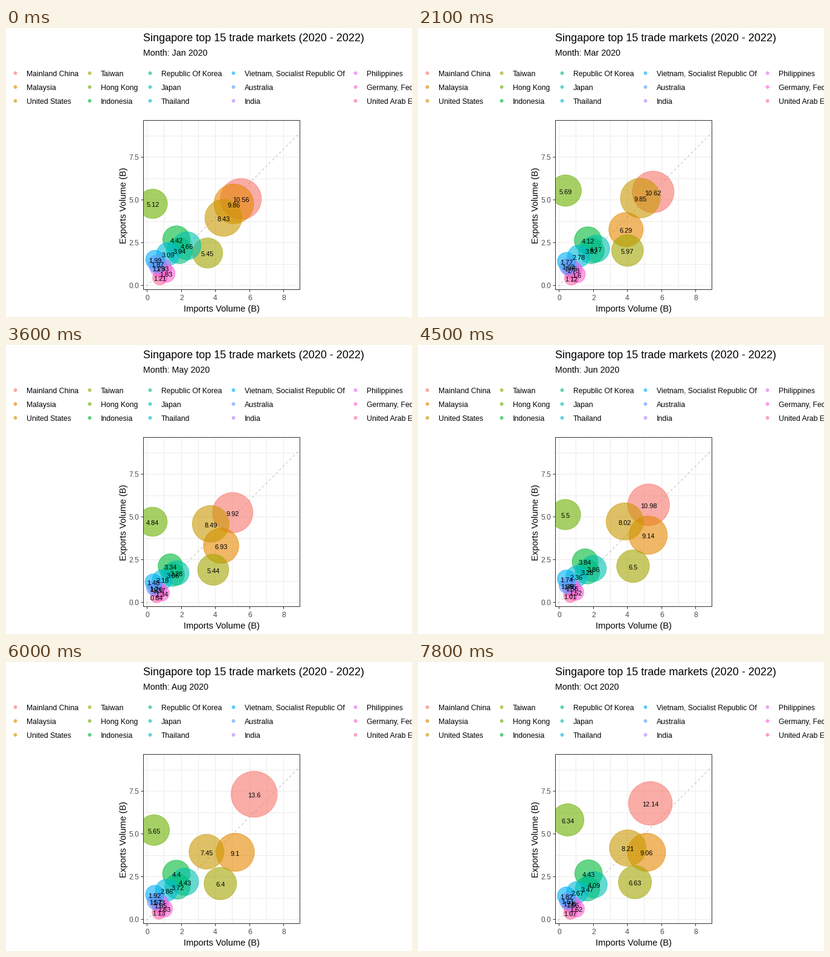
A matplotlib script for the animation above (8 s loop, 672 by 480 pixels).

```python
import matplotlib.pyplot as plt
import numpy as np
from matplotlib.animation import FuncAnimation
from matplotlib.patches import Circle, Rectangle

W, H, DPI = 672, 480, 100
PX = 72 / DPI
INTERVAL, FRAMES, FRAMES_PER_STEP = 100, 80, 3
DAYS_PER_STEP = 1065 / 99
LEFT, RIGHT, TOP, BOTTOM = 227, 486, 153, 434
ORIGIN = np.array([233.4, 427.9])
UNIT = np.array([28.3, -28.4])

plt.rcParams["font.family"] = ["Liberation Sans", "DejaVu Sans"]

LEGEND = [
    "Mainland China", "Malaysia", "United States", "Taiwan", "Hong Kong",
    "Indonesia", "Republic Of Korea", "Japan", "Thailand",
    "Vietnam, Socialist Republic Of", "Australia", "India", "Philippines",
    "Germany, Federal Republic Of", "United Arab Emirates",
]

# Monthly totals, and the import share at the start, middle and end.
MAJOR = {
    "Mainland China": ([10.56, 7.89, 11.35, 10.62, 9.92, 10.98, 10.93,
                        13.6, 12.04, 12.14], [0.52, 0.485, 0.44]),
    "Malaysia": ([9.86, 9.07, 8.1, 6.29, 6.93, 9.14, 9.18,
                  9.1, 9.15, 9.06], [0.515, 0.57, 0.565]),
    "United States": ([8.43, 8.66, 9.9, 9.85, 8.49, 8.02, 9.75,
                       7.45, 7.75, 8.21], [0.53, 0.44, 0.49]),
    "Taiwan": ([5.45, 5.62, 6.15, 5.97, 5.44, 6.5, 6.38,
                6.4, 6.77, 6.63], [0.65, 0.67, 0.67]),
    "Hong Kong": ([5.12, 5.34, 6.2, 5.69, 4.84, 5.5, 5.56,
                   5.65, 6.07, 6.34], [0.065, 0.065, 0.08]),
}
# Typical total and import share; these follow a common season.
MINOR = {
    "Indonesia": (4.2, 0.39),
    "Japan": (4.15, 0.5),
    "Republic Of Korea": (3.75, 0.48),
    "Thailand": (2.75, 0.4),
    "India": (1.65, 0.4),
    "Philippines": (1.7, 0.47),
    "United Arab Emirates": (1.1, 0.62),
    "Germany, Federal Republic Of": (1.67, 0.61),
    "Vietnam, Socialist Republic Of": (1.85, 0.235),
    "Australia": (1.6, 0.32),
}

START = np.datetime64("2020-01-01")
MONTHS = np.arange("2020-01", "2020-11", dtype="datetime64[M]")
MONTH_DAYS = (MONTHS.astype("datetime64[D]") - START).astype(int)
MONTH_STEPS = np.round(MONTH_DAYS / DAYS_PER_STEP)
STEPS = np.arange(-(-FRAMES // FRAMES_PER_STEP))


def season(month):
    """Slow decline with a sharp dip in May."""
    return 1.1 - 0.012 * month - 0.28 * np.exp(-(month - 4.2) ** 2)


def build_series():
    """Map each market to its monthly totals and its import share per step."""
    rng = np.random.default_rng(15)
    thirds = np.linspace(0, STEPS[-1], 3)
    series = {name: (np.array(totals), np.interp(STEPS, thirds, shares))
              for name, (totals, shares) in MAJOR.items()}
    months = np.arange(len(MONTHS))
    for name, (level, share) in MINOR.items():
        jitter = 1 + 0.03 * rng.standard_normal(len(months))
        series[name] = (level * season(months) * jitter,
                        np.full(len(STEPS), share))
    return series


def hue_color(index, count=len(LEGEND), chroma=100, lightness=65):
    """Evenly spaced hues at equal lightness, converted from CIE LUV."""
    hue = np.radians(15 + 360 * index / count)
    u = chroma * np.cos(hue) / (13 * lightness) + 0.1978
    v = chroma * np.sin(hue) / (13 * lightness) + 0.4683
    y = ((lightness + 16) / 116) ** 3
    xyz = np.array([9 * u / (4 * v), 1, (12 - 3 * u - 20 * v) / (4 * v)]) * y
    linear = np.array([[3.2406, -1.5372, -0.4986],
                       [-0.9689, 1.8758, 0.0415],
                       [0.0557, -0.2040, 1.0570]]) @ xyz
    linear = np.clip(linear, 0, 1)
    return tuple(np.where(linear <= 0.0031308, 12.92 * linear,
                          1.055 * linear ** (1 / 2.4) - 0.055))


def radius(total):
    return 4 + 9.46 * np.sqrt(max(total - 0.5, 0))


fig = plt.figure(figsize=(W / DPI, H / DPI), dpi=DPI, facecolor="white")
ax = fig.add_axes([0, 0, 1, 1])
ax.set(xlim=(0, W), ylim=(H, 0))
ax.axis("off")


def write(x, y, text, size, color="black", **kw):
    return ax.text(x, y, text, fontsize=size * PX, color=color,
                   va="baseline", **kw)


def line(xs, ys, color, **kw):
    return ax.plot(xs, ys, color=color, lw=PX, solid_capstyle="butt", **kw)[0]


def dot(x, y, r, color, zorder):
    return ax.add_patch(Circle((x, y), r, facecolor=color, edgecolor=color,
                               alpha=0.6, lw=0.94 * PX, zorder=zorder))


panel = ax.add_patch(Rectangle((LEFT, TOP), RIGHT - LEFT, BOTTOM - TOP,
                               fill=False, ec="#333333", lw=PX, zorder=8))

for i in range(9):
    x = np.floor(ORIGIN[0] + i * UNIT[0])
    line([x, x], [TOP, BOTTOM], "#EBEBEB", zorder=1)
    if i % 2 == 0:
        line([x, x], [BOTTOM, BOTTOM + 4], "#333333", zorder=8)
        write(x + 0.5, 452, str(i), 12, "#4D4D4D", ha="center")
for i in range(8):
    y = np.floor(ORIGIN[1] + i * 1.25 * UNIT[1])
    line([LEFT, RIGHT], [y, y], "#EBEBEB", zorder=1)
    if i % 2 == 0:
        line([LEFT - 4, LEFT], [y, y], "#333333", zorder=8)
        write(220, y + 5, f"{i * 1.25:.1f}", 12, "#4D4D4D", ha="right")

ends = ORIGIN + np.array([[-0.25, -0.25], [9, 9]]) * UNIT
diagonal = line(*ends.T, "#BEBEBE", dashes=(4, 4), zorder=2)
diagonal.set_clip_path(panel)

write(227, 22, "Singapore top 15 trade markets (2020 - 2022)", 18)
subtitle = write(227, 46, "", 14.3)
write(357, 471, "Imports Volume (B)", 14.6, ha="center")
write(199, 295, "Exports Volume (B)", 14.6, ha="center",
      rotation=90, rotation_mode="anchor")

COLORS = {name: hue_color(i) for i, name in enumerate(LEGEND)}
for i, (name, color) in enumerate(COLORS.items()):
    x = [15.5, 138.5, 238.5, 376.5, 578.5][i // 3]
    y = 75 + 23 * (i % 3)
    dot(x, y, 2.4, color, 3)
    write(x + 18.3, y + 5, name, 12.3)

SERIES = build_series()
bubbles = {name: dot(0, 0, 1, COLORS[name], 3) for name in SERIES}
values = {name: write(0, 0, "", 11, ha="center", zorder=6) for name in SERIES}
for artist in [*bubbles.values(), *values.values()]:
    artist.set_clip_path(panel)


def update(frame):
    step = frame // FRAMES_PER_STEP
    date = START + int(step * DAYS_PER_STEP)
    subtitle.set_text(date.item().strftime("Month: %b %Y"))
    # Labels switch halfway between two months.
    halfway = (MONTH_STEPS[1:] + MONTH_STEPS[:-1]) / 2
    month = np.searchsorted(halfway, step, side="right")
    for name, (totals, shares) in SERIES.items():
        total = np.interp(step, MONTH_STEPS, totals)
        share = shares[step]
        x, y = ORIGIN + total * np.array([share, 1 - share]) * UNIT
        bubbles[name].center = x, y
        bubbles[name].set_radius(radius(total))
        values[name].set_position((x, y + 5.5))
        values[name].set_text(f"{round(totals[month], 2):g}")
    return [subtitle, *bubbles.values(), *values.values()]


anim = FuncAnimation(fig, update, frames=FRAMES, interval=INTERVAL,
                     repeat=True, repeat_delay=0)
plt.show()
```
